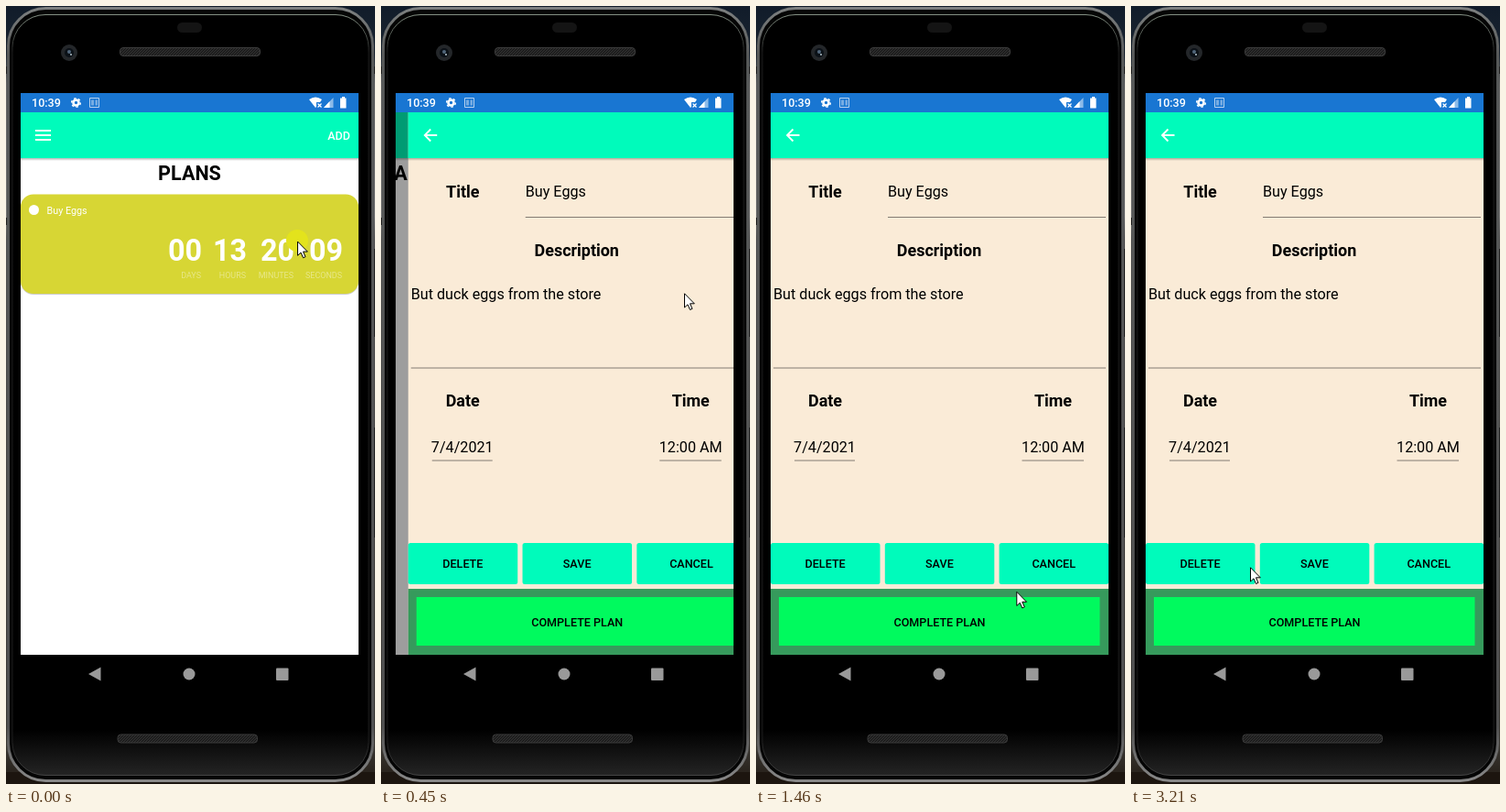
Recreate the animation shown at these times as an HTML page. Size 403 by 849 pixels, loop 3340 ms.

```html
<!DOCTYPE html>
<html lang="en">
<head>
<meta charset="utf-8">
<title>Plans app</title>
<style>
  html, body { margin: 0; width: 100%; height: 100%; overflow: hidden; background: #000; }
  svg { display: block; width: 100vw; height: 100vh; }
  text { font: 16.16px Roboto, Arial, sans-serif; }
  .mid { text-anchor: middle; }
  .end { text-anchor: end; }
  .head { font-size: 17.96px; font-weight: 700; }
  .page { font-size: 21.55px; font-weight: 700; }
  .btn { font-size: 12.57px; font-weight: 500; }
  .small { font-size: 10.77px; }
  .num { font-size: 32.3px; font-weight: 700; }
  .unit { font-size: 8.98px; fill-opacity: .42; }
</style>
</head>
<body>
<svg viewBox="0 0 403 849" preserveAspectRatio="none">
  <defs>
    <linearGradient id="room" x2="0" y2="1">
      <stop stop-color="#111c2a"/><stop offset=".06" stop-color="#1a2430"/>
      <stop offset=".1" stop-color="#666"/><stop offset=".27" stop-color="#777"/>
      <stop offset=".3" stop-color="#555"/><stop offset=".95" stop-color="#3c3934"/>
      <stop offset="1" stop-color="#211a13"/>
    </linearGradient>
    <linearGradient id="rim" x2="0" y2="1">
      <stop stop-color="#7d8080"/><stop offset=".06" stop-color="#575959"/>
      <stop offset=".93" stop-color="#505050"/><stop offset="1" stop-color="#888"/>
    </linearGradient>
    <linearGradient id="glint" x2="0" y2="1">
      <stop stop-color="#849084"/><stop offset=".05" stop-color="#1b1b1b"/>
      <stop offset=".95" stop-color="#1b1b1b"/><stop offset="1" stop-color="#444"/>
    </linearGradient>
    <linearGradient id="chin" x2="0" y2="1">
      <stop/><stop offset=".94"/><stop offset="1" stop-color="#242424"/>
    </linearGradient>
    <linearGradient id="shade" x2="0" y2="1">
      <stop stop-opacity=".28"/><stop offset="1" stop-opacity="0"/>
    </linearGradient>
    <pattern id="mesh" width="3" height="3" patternUnits="userSpaceOnUse">
      <rect width="3" height="3" fill="#2c2c2c"/><path d="M0 3L3 0" stroke="#151515"/>
    </pattern>
    <clipPath id="view"><path d="M16 116H385V708H16Z"/></clipPath>
    <g id="bar">
      <path d="M16 116H385V166H16Z" fill="#00fbbb"/>
      <path d="M16 166H385V169H16Z" fill="url(#shade)"/>
    </g>
  </defs>

  <!-- Phone body -->
  <rect width="403" height="849" fill="url(#room)"/>
  <path d="M0 836H403V849H0Z" fill="#1c150f"/>
  <path d="M0 66H4V74H0ZM0 231H4V239H0ZM399 66H403V74H399ZM399 265H403V361H399ZM399 460H403V580H399Z" fill="#222"/>
  <rect x="2.5" y="2.5" width="398" height="843" rx="41" fill="#050505" stroke="url(#rim)" stroke-width="3"/>
  <rect x="7" y="9.5" width="389" height="830" rx="36" fill="url(#chin)" stroke="url(#glint)"/>
  <rect x="187" y="18" width="27" height="11" rx="5.5" fill="#141414"/>
  <circle cx="69" cy="51" r="9" fill="#24272a"/>
  <circle cx="69" cy="51" r="5" fill="#0b1117"/>
  <circle cx="69" cy="50" r="2" fill="#51667a"/>
  <circle cx="71" cy="53" r="1" fill="#b5c3cc"/>
  <g fill="url(#mesh)" stroke="#3b3b3b">
    <rect x="124.5" y="45.5" width="153" height="9" rx="3.5"/>
    <rect x="122" y="795" width="152.5" height="9" rx="3.5"/>
  </g>

  <!-- Status bar -->
  <path d="M16 95H385V116H16Z" fill="#1976d2"/>
  <g fill="#fff">
    <text x="28" y="110" class="btn">10:39</text>
    <g fill="none" stroke="#fff">
      <circle cx="76.5" cy="105.5" r="3" stroke-width="2.6"/>
      <circle cx="76.5" cy="105.5" r="4.8" stroke-width="1.5" pathLength="12" stroke-dasharray="1"/>
    </g>
    <path d="M91.5 100.5H101.5V110.5H91.5Z" fill="none" stroke="#b7d2ef"/>
    <path d="M93 105.5H100" stroke="#b7d2ef" stroke-width="6" stroke-dasharray="3 1.5" opacity=".6"/>
    <path d="M331 102Q338 97 345 102L343 105H339V110L338 111Z"/>
    <path d="M340.5 106.5L344.5 110.5M344.5 106.5L340.5 110.5" stroke="#fff" stroke-width="1.2"/>
    <path d="M347 111L357.5 100V111Z" opacity=".5"/>
    <path d="M347 111L353.5 104V111Z"/>
    <path d="M365 100.5H367V99H370V100.5H371.5V111.5H365Z"/>
  </g>

  <g clip-path="url(#view)">
    <g id="home">
      <path d="M16 116H385V708H16Z" fill="#fff"/>
      <use href="#bar"/>
      <path d="M32 136H49M32 141H49M32 146H49" stroke="#fff" stroke-width="2"/>
      <text x="376" y="146" class="btn end" fill="#fff">ADD</text>
      <text x="200.5" y="189.5" class="page mid">PLANS</text>
      <g id="card" fill="#fff">
        <rect x="16" y="206.5" width="369" height="108.5" rx="14" fill="#000" opacity=".2"/>
        <rect x="16" y="205.5" width="369" height="108.5" rx="14" fill="#d7d634"/>
        <circle cx="30.5" cy="222.5" r="5.5"/>
        <text x="44.5" y="226.5" class="small">Buy Eggs</text>
        <g id="count"></g>
      </g>
    </g>
    <path id="dim" d="M16 116H385V708H16Z"/>
    <g id="detail">
      <path d="M16 116H385V708H16Z" fill="#faebd7"/>
      <use href="#bar"/>
      <path d="M47.5 141H34M40.5 134.500L34 141L40.5 147.500" fill="none" stroke="#fff" stroke-width="1.8"/>
      <text x="75.5" y="209" class="head mid">Title</text>
      <text x="144" y="208">Buy Eggs</text>
      <text x="200" y="272.5" class="head mid">Description</text>
      <text x="19" y="320">But duck eggs from the store</text>
      <text x="75.5" y="437" class="head mid">Date</text>
      <text x="324.5" y="437" class="head mid">Time</text>
      <text x="75" y="487" class="mid">7/4/2021</text>
      <text x="324.5" y="487" class="mid">12:00 AM</text>
      <path d="M144 230.5H382M19 395H382M42 496H108M290.5 496H358" stroke="#827b72"/>
      <g id="buttons"></g>
      <path d="M16 636H385V708H16Z" fill="#369a5c"/>
      <path d="M25 645H375.5V698H25Z" fill="#00fa5e"/>
      <text x="200.5" y="676.5" class="btn mid">COMPLETE PLAN</text>
    </g>
  </g>

  <g fill="#999">
    <path d="M90 729L103.5 721.5V736.5Z"/>
    <circle cx="200" cy="729" r="6.5"/>
    <rect x="295" y="722.5" width="13.5" height="13.5" rx="1"/>
  </g>

  <circle id="click" cx="318" cy="256" r="12" fill="#e3e31c"/>
  <path id="cursor" d="M.5 .8V16L4 12.8L6.5 18.5L9 17.4L6.5 11.8H11.3Z" fill="#fff" stroke="#000"/>
</svg>
<script>
const $ = id => document.getElementById(id);
const LOOP = 3340, WIDTH = 369, SAMPLE = 70;

$('count').innerHTML = [['00', 'DAYS', 213], ['13', 'HOURS', 262], ['20', 'MINUTES', 314], ['09', 'SECONDS', 367]]
  .map(([n, unit, x]) => `<text x="${x + 1}" y="277.5" class="num end">${n}</text>
    <text x="${x}" y="297" class="unit end">${unit}</text>`).join('');

$('buttons').innerHTML = ['DELETE', 'SAVE', 'CANCEL']
  .map((label, i) => `<rect x="${16 + 124.8 * i}" y="586" width="119.5" height="45" rx="2.5" fill="#00fbbb"/>
    <text x="${75.6 + 124.8 * i}" y="613" class="btn mid">${label}</text>`).join('');

function makePath(d) {
  const path = document.createElementNS('http://www.w3.org/2000/svg', 'path');
  path.setAttribute('d', d);
  return path;
}

// Pointer strokes; the pointer rests after each one until it hides
const strokes = [
  { from: 0, to: 210, hide: 720, d: 'M318 256L331 313' },
  { from: 720, to: 970, hide: 980, d: 'M331 313Q180 90 29 400' },
  { from: 1110, to: 1870, hide: 1940, d: 'M110 590L204 601Q310 595 354 816L361 840' },
  { from: 2530, to: 3010, hide: 3140, d: 'M360 815Q330 580 179 633' },
  { from: 3140, to: 3205, hide: LOOP, d: 'M179 633L130 612' }
].map(s => ({ ...s, path: makePath(s.d) }));

const show = (id, on) => $(id).setAttribute('visibility', on ? 'visible' : 'hidden');
const move = (id, x, y = 0) => $(id).setAttribute('transform', `translate(${x} ${y})`);

function slide(t) {
  const sampled = Math.floor(t / SAMPLE) * SAMPLE;
  return 1 - Math.exp(-Math.pow(Math.max(0, (sampled - 257) / 96), 2.25));
}

function drawPointer(t) {
  const { from, to, hide, path } = strokes.findLast(s => s.from <= t);
  const part = Math.min(1, (t - from) / (to - from));
  const { x, y } = path.getPointAtLength(part * path.getTotalLength());
  move('cursor', x, y);
  show('cursor', t < hide);
}

function draw(t) {
  const p = slide(t);
  move('home', -p * WIDTH / 2);
  move('detail', (1 - p) * WIDTH);
  $('dim').setAttribute('opacity', .4 * p);
  show('card', t < 210);
  show('click', t < 70);
  drawPointer(t);
}

const start = performance.now();
function tick() {
  draw(Math.max(0, performance.now() - start) % LOOP);
  requestAnimationFrame(tick);
}
tick();
</script>
</body>
</html>
```
